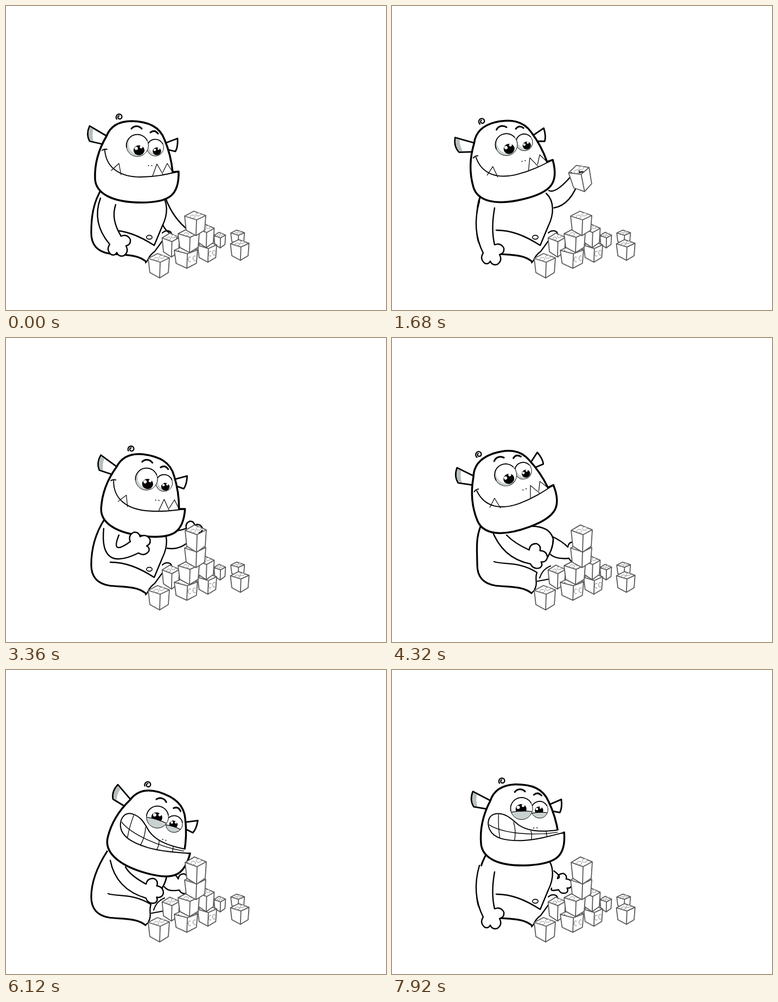
Write an HTML page with a canvas that moves like this. It is 700 px wide and 560 px high and loops after 8000 ms.

```html
<!DOCTYPE html>
<html lang="en">
<head>
<meta charset="utf-8">
<title>Building blocks</title>
<style>
html, body { margin: 0; width: 100%; height: 100%; overflow: hidden; background: #fff; }
canvas { display: block; }
</style>
</head>
<body>
<canvas id="stage" width="700" height="560"></canvas>
<script>
const ctx = document.getElementById('stage').getContext('2d');
const LOOP = 8000, STEP = 120, TURN = Math.PI * 2, DEG = Math.PI / 180;
const INK = '#000', SHADE = '#c9d1d1', BLOCK_INK = '#5a5a5a';
ctx.lineCap = ctx.lineJoin = 'round';

function paint(shape, width, fill, ink) {
  if (fill) { ctx.fillStyle = fill; ctx.fill(shape); }
  if (width) { ctx.lineWidth = width; ctx.strokeStyle = ink; ctx.stroke(shape); }
}

function draw(path, width, fill, ink = INK) {
  paint(new Path2D(path), width, fill, ink);
}

function oval(x, y, rx, ry, width, fill, ink = INK, from = 0, to = TURN) {
  const shape = new Path2D();
  shape.ellipse(x, y, rx, ry, 0, from, to);
  paint(shape, width, fill, ink);
}

// Draws with the point (ox, oy) moved to (x, y) and turned by angle.
function placed(x, y, angle, ox, oy, drawPart) {
  ctx.save();
  ctx.translate(x, y);
  ctx.rotate(angle * DEG);
  ctx.translate(-ox, -oy);
  drawPart();
  ctx.restore();
}

// Eased blend between the two keys [time, ...values] around t.
function at(track, t) {
  const next = track.findIndex(key => key[0] > t);
  if (next < 1) return track.at(next).slice(1);
  const [t0, ...a] = track[next - 1], [t1, ...b] = track[next];
  const u = (t - t0) / (t1 - t0), ease = u * u * (3 - 2 * u);
  return a.map((v, i) => v + (b[i] - v) * ease);
}

// Hair curl x, y and lean angle
const headTrack = [
  [0, 209, 204, 0], [1080, 165, 212, -14.4], [1920, 166, 212, -14],
  [3000, 231, 204, 5.5], [3360, 231, 204, 5.5], [4320, 160, 214, -20.3],
  [4800, 148, 217, -24], [5400, 264, 211, 17.2], [6000, 264, 211, 16.5],
  [6840, 224, 210, 4.6], [7560, 203, 204, -3]
];

// Arm poses: shoulder, elbow, hand, hand angle
const near = {
  rest: [188, 360, 175, 396, 201, 432, 0],
  back: [175, 366, 164, 411, 178, 448, 0],
  chest: [194, 357, 182, 417, 237, 386, -90],
  clasp: [197, 357, 214, 392, 254, 404, -60],
  bow: [208, 356, 220, 390, 266, 404, -60],
  proud: [189, 362, 176, 400, 188, 442, 0]
};
const nearTrack = [
  [0, ...near.rest], [720, ...near.back], [2040, ...near.back], [2520, ...near.rest],
  [3120, ...near.chest], [3360, ...near.chest], [3960, ...near.clasp], [4680, ...near.clasp],
  [5400, ...near.bow], [6000, ...near.bow], [6600, ...near.proud], [6960, ...near.proud],
  [7560, ...near.back]
];

const far = {
  hidden: [292, 370, 293, 402, 332, 424, -20],
  hold: [287, 356, 312, 361, 336, 322, -85],
  place: [297, 371, 318, 375, 338, 360, -85],
  clasp: [292, 381, 308, 392, 325, 396, -60],
  side: [296, 386, 302, 395, 306, 395, -60]
};
const farTrack = [
  [0, ...far.hidden], [240, ...far.hidden], [840, ...far.hold], [1920, ...far.hold],
  [2520, ...far.place], [3360, ...far.place], [3960, ...far.clasp], [5880, ...far.clasp],
  [6480, ...far.side]
];

const KNUCKLES = [[-10, 7], [-7, 26], [3, 22], [16, 28], [20, 10], [28, -2], [11, -8]];

// The shoulder offset points from the arm's middle line to its outer edge.
function drawArm([sx, sy, ex, ey, hx, hy, angle], size, offX, offY) {
  const c = Math.cos(angle * DEG) * size, s = Math.sin(angle * DEG) * size;
  const joints = KNUCKLES.map(([x, y]) => [hx + x * c - y * s, hy + x * s + y * c]);
  const dx = hx - sx, dy = hy - sy, k = 18 / Math.hypot(dx, dy);
  let path = `M${sx + offX} ${sy + offY}Q${ex - dy * k} ${ey + dx * k} ${joints[0]}`;
  for (let i = 1; i < joints.length; i++) {
    const [x0, y0] = joints[i - 1], [x1, y1] = joints[i];
    path += `Q${(x0 + x1) / 2 - (y1 - y0) * 0.45} ${(y0 + y1) / 2 + (x1 - x0) * 0.45} ${x1} ${y1}`;
  }
  draw(path + `Q${ex + dy * k} ${ey - dx * k} ${sx - offX} ${sy - offY}`, 2.4, '#fff');
}

function drawBody(headX, leaning) {
  const top = 170 + (headX - 160) * 0.16;
  const back = `M${top} 334C${top - 18} 362 157 390 157 418C157 443 172 453 190 456C212 459 240 456 257 470`;
  draw(back + 'L273 438L288 404C301 385 302 362 285 344Z', 0, '#fff');
  draw(back, 3.2);
  if (leaning) {
    draw('M268 448L290 444M272 442C276 430 282 424 292 420', 2.2);
    draw('M250 347C280 345 293 356 297 370C297 385 291 396 286 405', 2.6);
    draw('M188 412C205 418 235 411 267 432C262 445 270 450 262 465L257 470', 2.3);
  } else {
    draw('M288 418C294 412 304 413 305 420M257 473C264 468 259 463 274 452L290 430', 2.2);
    draw('M284 345C300 360 298 385 288 405L273 441C245 423 220 413 192 413', 2.4);
    oval(264, 426, 5.2, 3.6, 1.6, '#fff');
  }
}

function drawEye(x, y, r, mood) {
  oval(x, y, r, r, 0, '#fff');
  if (mood === 'closed') {
    oval(x, y, r, r, 0.7, null, '#777');
    oval(x, y, r, r, 2.3, null, INK, 0.25, Math.PI - 0.1);
    return;
  }
  const happy = mood === 'happy', pupil = r * 0.5;
  const px = happy ? x - 1 : x + 3, py = happy ? y + 1 : y + r * 0.43;
  ctx.save();
  const ball = new Path2D();
  ball.arc(x, y, r, 0, TURN);
  ctx.clip(ball);
  if (!happy) {
    oval(x, y, r, r, 0, SHADE);
    oval(x + 4, y - 3, r, r, 0, '#fff');
  }
  oval(px, py, pupil, pupil * 0.92, 0, INK);
  oval(px - pupil * 0.5, py - pupil * 0.35, pupil * 0.3, pupil * 0.3, 0, '#fff');
  oval(px + pupil * 0.4, py - pupil * 0.6, pupil * 0.26, pupil * 0.26, 0, '#fff');
  if (happy) draw(`M${x - r - 2} ${y + 6}Q${x} ${y + 3} ${x + r + 2} ${y + 7}v30h${-2 * r - 4}Z`, 1.2, SHADE);
  ctx.restore();
  oval(x, y, r, r, 0.9);
  oval(x, y, r, r, 1.7, null, INK, Math.PI * 0.95, Math.PI * 1.85);
}

function drawMouth(grin) {
  if (grin) {
    draw('M306 300C270 303 250 298 235 287C223 276 214 264 195 264C179 265 177 281 181 292' +
      'C188 310 210 315 240 316C265 316 290 311 318 305', 2, '#fff');
    draw('M181 284C205 301 260 309 306 304M199 266Q197 288 199 308M226 281Q230 298 226 315' +
      'M257 299Q259 307 257 315M285 302L286 311', 1.3);
  } else {
    draw('M194 303L208 290L212 311M270 313L278 291L289 310M289 306L297 290L307 306', 1.2);
    draw('M182 266C185 300 212 315 248 315C275 315 296 310 318 305M177 266Q181 263 186 264', 1.9);
  }
}

function drawCurl(x, y) {
  ctx.beginPath();
  for (let u = 0; u <= 1; u += 0.04) {
    const a = 2.5 + u * 8.5, r = 6.5 - u * 4.5;
    ctx.lineTo(x + r * Math.cos(a), y + r * Math.sin(a));
  }
  ctx.lineWidth = 2.2;
  ctx.strokeStyle = INK;
  ctx.stroke();
}

function drawHead(t, mood) {
  const [x, y, angle] = at(headTrack, t);
  const drag = at(headTrack, Math.max(0, t - 240))[2] - angle;
  const earTilt = Math.max(-14, Math.min(16, drag * 4));
  placed(x, y, angle, 209, 204, () => {
    placed(185, 248, earTilt, 185, 248, () => {
      draw('M188 241L154 221Q147 236 154 249L180 255', 2.8, '#fff');
      draw('M155 223L161 227Q158 238 161 249L155 248Q149 237 155 223Z', 0, '#b5bfbf');
    });
    placed(293, 258, -earTilt, 293, 258, () =>
      draw('M292 253L316 244Q317 260 312 268L296 264', 2.8, '#fff'));
    draw('M318 305L307 306C305 285 300 265 292 246C283 222 262 213 232 212C208 212 192 222 185 240' +
      'C172 262 163 290 164 318C165 345 195 362 250 362C303 362 319 347 318 305', 3.5, '#fff');
    drawCurl(209, 204.5);
    draw('M231 226C236 220 245 220 250 226M266 233C271 229 276 230 280 235', 3);
    drawEye(275, 261, 15.5, mood);
    drawEye(242, 257, 20.3, mood);
    for (const nostril of [262.5, 268.5]) oval(nostril, 294, 1, 1, 0, INK);
    drawMouth(mood === 'happy');
  });
}

// One block shape serves all; w and h scale it.
function drawBlock(x, y, w, h, sideStuds) {
  const [a, b, c, d, l, f, r] = [[-20, -13], [-3, -22], [19, -14], [2, -6], [-17, 13], [1, 23], [17, 13]]
    .map(([px, py]) => `${x + px * w} ${y + py * h}`);
  draw(`M${a}L${b}L${c}L${r}L${f}L${l}ZM${a}L${d}L${c}M${d}L${f}`, 1.8, '#fff', BLOCK_INK);
  for (const side of [-1, 1]) {
    if (sideStuds) oval(x + (10 + side * 4) * w, y + (4 - side) * h, 3, 4.6, 1, null, '#777', 1, 5.3);
    else oval(x + side * 5 * w, y + (-14 - side * 2) * h, 4.4 * w, 2.8 * h, 0.9, '#fff', '#888');
  }
}

const pile = [
  [394, 431, 0.55, 0.64], [427, 426, 0.65, 0.6], [431, 449, 0.88, 0.85], [304, 440, 0.82, 0.98],
  [371, 452, 0.9, 0.87, true], [368, 423, 0.82, 0.97], [332, 462, 1.1, 0.92, true],
  [337, 432, 1, 0.97], [349, 400, 1, 1], [282, 478, 1, 1]
];

const carriedTrack = [[240, 362, 425, 0], [840, 366, 326, -11], [1680, 348, 317, -13],
  [1920, 348, 317, -13], [2520, 350, 369, 0]];

function drawCarried(t) {
  const [x, y, angle] = at(carriedTrack, t);
  placed(x, y, angle, 0, 0, () => drawBlock(0, 0, 1, 1.12));
}

function drawScene(t) {
  ctx.fillStyle = '#fff';
  ctx.fillRect(0, 0, 700, 560);
  const mood = t >= 6120 ? 'happy' : t >= 5160 ? 'closed' : 'open';
  const handOverChin = t >= 2760 && t < 3720;
  const drawNear = () => drawArm(at(nearTrack, t), 1, -14, -6);
  drawArm(at(farTrack, t), 0.8, -2, 16);
  drawBody(at(headTrack, t)[0], t >= 3840 && t < 6360);
  if (!handOverChin) drawNear();
  drawHead(t, mood);
  if (handOverChin) drawNear();
  if (t >= 240 && t < 600) drawCarried(t);
  pile.forEach(block => drawBlock(...block));
  if (t >= 600) drawCarried(t);
}

const start = performance.now();
function tick() {
  const t = (performance.now() - start) % LOOP;
  drawScene(Math.floor(t / STEP) * STEP);
  requestAnimationFrame(tick);
}
tick();
</script>
</body>
</html>
```
